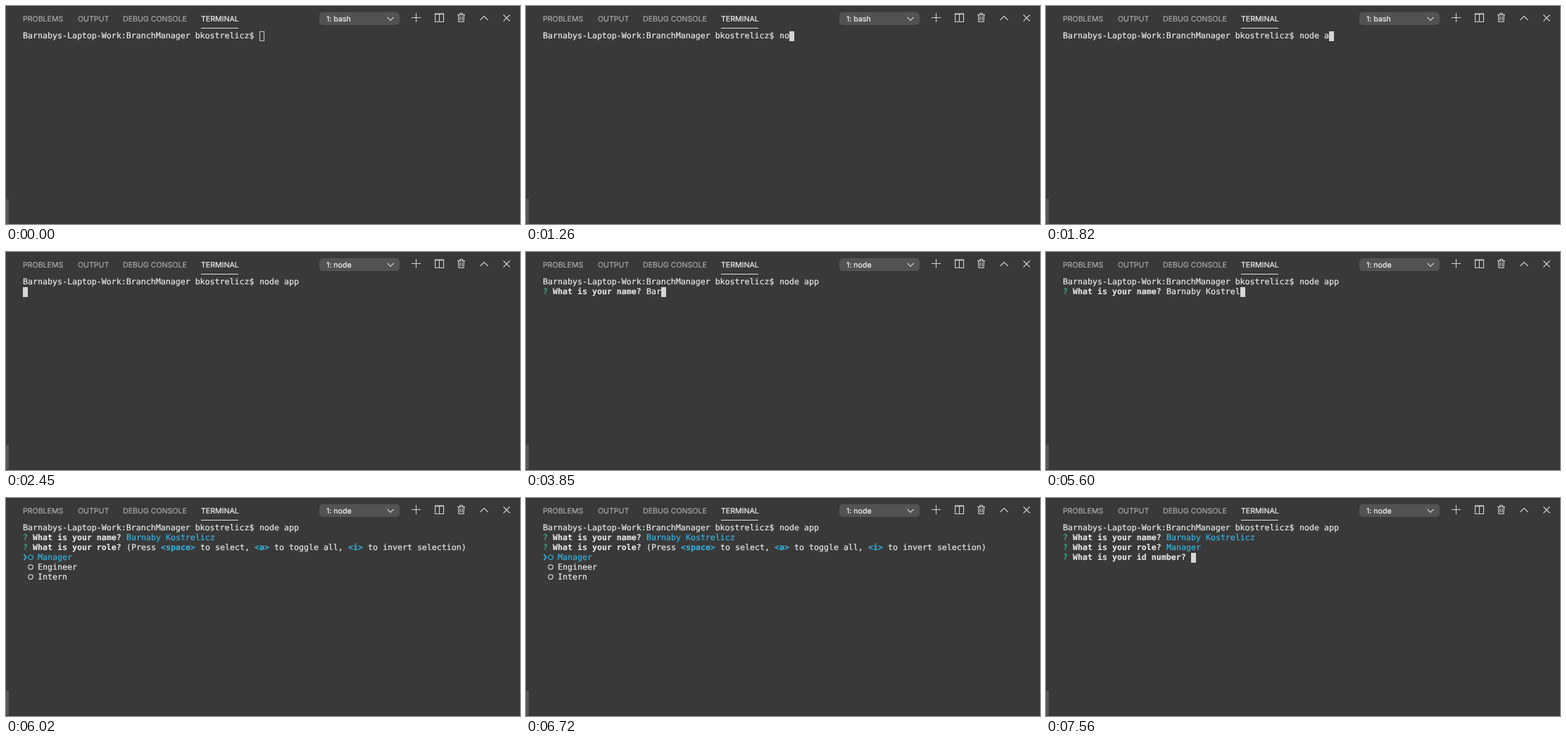
An HTML page for the animation above (8000 ms loop, 730 px wide and 310 px high).

```html
<!DOCTYPE html>
<html lang="en">
<head>
<meta charset="utf-8">
<title>Terminal prompt</title>
<style>
html, body { margin: 0; width: 100%; height: 100%; overflow: hidden; background: #393939; }
svg { display: block; }
text { white-space: pre; text-rendering: geometricPrecision; }
text, tspan { fill: currentColor; stroke: currentColor; stroke-width: .22; }
.ui { font: 10.6px Inter, "Liberation Sans", sans-serif; color: #a9a9a9; }
.ui .on { color: #f0f0f0; }
.icons { fill: none; stroke: #d2d2d2; stroke-width: 1.1; }
#term { font: 11.627px "DejaVu Sans Mono", monospace; color: #e6e6e6; }
.bold, .key { font-weight: bold; stroke-width: .1; }
.cyan, .key { color: #35b0dc; }
.green { color: #3fb78c; }
.ring { fill: none; stroke: currentColor; stroke-width: 1.1; }
.dot { fill: currentColor; }
.pointer { fill: none; stroke: currentColor; stroke-width: 1.8; }
.cursor { fill: #d6d6d6; }
.cursor.idle { fill: none; stroke: #cacaca; }
</style>
</head>
<body>
<svg width="730" height="310" viewBox="0 0 730 310">
  <rect width="730" height="310" fill="#393939"/>
  <rect id="grip" width="4" height="35" fill="#565656"/>
  <rect x="445" y="8.8" width="114" height="18.2" rx="5" fill="#525252"/>
  <g class="ui">
    <text x="24" y="22">PROBLEMS</text>
    <text x="102" y="22">OUTPUT</text>
    <text x="166" y="22">DEBUG CONSOLE</text>
    <text x="277" y="22" class="on">TERMINAL</text>
    <text id="shell" x="455" y="22" class="on"></text>
  </g>
  <rect x="277" y="31" width="53" height="1" fill="#e0e0e0"/>
  <g class="icons">
    <path d="M541.5 16l4.5 4.5 4.5-4.5"/>
    <path d="M576 16.5h13M582.5 10v13"/>
    <path d="M609.5 11v11.5h12v-11.5M615.5 11v11.5"/>
    <path d="M609 11.3h13" stroke-width="1.8"/>
    <path d="M641 12.5h11M644.5 12.5v-2h4v2M642.5 12.5l.5 10h7l.5-10M645 14.5v6M648 14.5v6"/>
    <path d="M673.5 20l5.5-5.5 5.5 5.5"/>
    <path d="M706.5 12.5l9 9M715.5 12.5l-9 9"/>
  </g>
  <g id="term"></g>
</svg>
<script>
const LOOP = 8000, LEFT = 24, TOP = 36, CELL = 7, LINE = 14;
const PROMPT = "Barnabys-Laptop-Work:BranchManager bkostrelicz$ ";
const COMMAND = "node app", NAME = "Barnaby Kostrelicz";
const ROLES = ["Manager", "Engineer", "Intern"];

const COMMAND_KEYS = [1120, 1260, 1400, 1540, 1680, 1820, 1960, 2100];
const NAME_KEYS = [3430, 3640, 3780, 3920, 4060, 4200, 4340, 4550, 4830,
  4970, 5110, 5250, 5390, 5460, 5600, 5670, 5810, 5880];
const FOCUS = 840, RUN = 2240, RETITLE = 2380, ASK_NAME = 2730;
const ASK_ROLE = 6020, SELECT = 6790, ASK_ID = 7000;

const HINT = [["(Press "], ["<space>", "key"], [" to select, "], ["<a>", "key"],
  [" to toggle all, "], ["<i>", "key"], [" to invert selection)"]];

const term = document.getElementById("term");
const shell = document.getElementById("shell");
const grip = document.getElementById("grip");

function add(tag, attrs, parent = term) {
  const el = document.createElementNS("http://www.w3.org/2000/svg", tag);
  for (const k in attrs) el.setAttribute(k, attrs[k]);
  return parent.appendChild(el);
}

// Writes styled runs on the character grid and returns the next column.
function write(row, col, runs) {
  const line = add("text", { y: TOP + row * LINE + 10 });
  for (const [text, style = ""] of runs) {
    add("tspan", { x: LEFT + col * CELL, class: style }, line).textContent = text;
    col += text.length;
  }
  return col;
}

const ask = (row, question, ...runs) =>
  write(row, 0, [["? ", "green"], [question, "bold"], [" "], ...runs]);

function cursor(row, col, focused) {
  const x = LEFT + col * CELL, y = TOP + row * LINE;
  if (focused) add("rect", { x, y, width: CELL, height: LINE, class: "cursor" });
  else add("rect", { x: x + .5, y: y + .5, width: 6, height: 13, class: "cursor idle" });
}

function roleList(checked) {
  ROLES.forEach((role, i) => {
    const row = 3 + i, cy = TOP + row * LINE + 6.2;
    const active = i === 0, marked = active && checked;
    const tone = active ? "cyan" : "";
    if (active) add("path", { d: `M25.5 ${cy - 4}l3.2 4-3.2 4`, class: "pointer cyan" });
    add("circle", { cx: 35, cy, r: 3.2, class: "ring " + (marked ? "green" : tone) });
    if (marked) add("circle", { cx: 35, cy, r: 1.7, class: "dot green" });
    write(row, 3, [[role, tone]]);
  });
}

const typed = (text, keys, t) => text.slice(0, keys.filter(k => k <= t).length);

function draw(t) {
  term.replaceChildren();
  shell.textContent = t < RETITLE ? "1: bash" : "1: node";
  grip.setAttribute("y", t < 560 ? 275 : 274);

  const end = write(0, 0, [[PROMPT], [typed(COMMAND, COMMAND_KEYS, t)]]);
  if (t < RUN) return cursor(0, end, t >= FOCUS);
  if (t < ASK_NAME) return cursor(1, 0, true);

  const named = t >= ASK_ROLE;
  const col = ask(1, "What is your name?", [typed(NAME, NAME_KEYS, t), named ? "cyan" : ""]);
  if (!named) return cursor(1, col, true);

  const answer = t >= ASK_ID ? [[ROLES[0], "cyan"]] : t >= SELECT ? [] : HINT;
  ask(2, "What is your role?", ...answer);
  if (t < ASK_ID) return roleList(t >= SELECT);
  cursor(3, ask(3, "What is your id number?"), true);
}

function tick() {
  draw(performance.now() % LOOP);
  requestAnimationFrame(tick);
}
tick();
</script>
</body>
</html>
```
